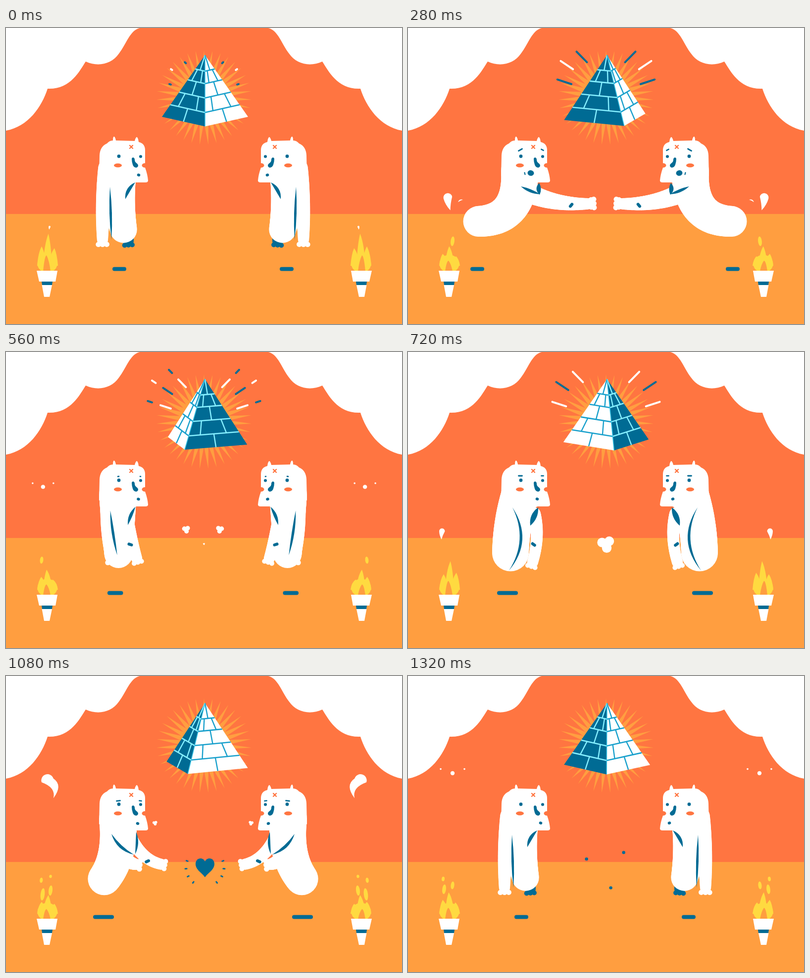
Write an HTML page with a canvas that moves like this. It is 800 px wide and 600 px high and loops after 1.36 s.

```html
<!DOCTYPE html>
<html lang="en">
<head>
<meta charset="utf-8">
<title>Pyramid ritual</title>
<style>
html, body { margin: 0; width: 100%; height: 100%; overflow: hidden; }
canvas { display: block; width: 800px; height: 600px; }
</style>
</head>
<body>
<canvas id="stage" width="800" height="600"></canvas>
<script>
const ctx = document.getElementById('stage').getContext('2d');
const RED = '#ff7541', ORANGE = '#ff9e40', BLUE = '#006b94', YELLOW = '#ffda40', WHITE = '#fff';
const STEP = 40, FRAMES = 34, CYCLE = 17, TAU = Math.PI * 2;

// ---------- helpers ----------
const lerp = (a, b, u) => a + (b - a) * u;
const mix = (a, b, u) => a.map((v, i) => lerp(v, b[i], u));
const clamp = u => Math.min(1, Math.max(0, u));
const smooth = u => u * u * (3 - 2 * u);
const rad = deg => deg * Math.PI / 180;

// Point on a Bezier curve of any degree, given flat x,y pairs.
function bezier(p, u) {
  while (p.length > 2) p = mix(p.slice(0, -2), p.slice(2), u);
  return p;
}

function fillPath(color, build) {
  ctx.fillStyle = color;
  ctx.beginPath();
  build();
  ctx.fill();
}

const ellipse = (color, x, y, rx, ry = rx, turn = 0) =>
  fillPath(color, () => ctx.ellipse(x, y, rx, ry, turn, 0, TAU));

const polygon = (color, ...pts) =>
  fillPath(color, () => { for (let i = 0; i < pts.length; i += 2) ctx.lineTo(pts[i], pts[i + 1]); });

function line(color, width, x1, y1, x2, y2, cap = 'round') {
  ctx.strokeStyle = color;
  ctx.lineWidth = width;
  ctx.lineCap = cap;
  ctx.beginPath();
  ctx.moveTo(x1, y1);
  ctx.lineTo(x2, y2);
  ctx.stroke();
}

// Tapered tube along a curve.
function limb(color, path, r0, r1) {
  for (let u = 0; u <= 1; u += 1 / 48) ellipse(color, ...bezier(path, u), lerp(r0, r1, u));
}

// Two arcs between the same tips, each bowed sideways by its own amount.
function crescent(color, [x1, y1, x2, y2, bowA, bowB]) {
  const len = Math.hypot(x2 - x1, y2 - y1), nx = (y1 - y2) / len, ny = (x2 - x1) / len;
  const control = bow => [(x1 + x2) / 2 + nx * bow * 2, (y1 + y2) / 2 + ny * bow * 2];
  fillPath(color, () => {
    ctx.moveTo(x1, y1);
    ctx.quadraticCurveTo(...control(bowA), x2, y2);
    ctx.quadraticCurveTo(...control(bowB), x1, y1);
  });
}

// Three dots evenly spaced on a ring.
function trio(color, x, y, ring, turn, r) {
  for (let i = 0; i < 3; i++) {
    const a = rad(turn + i * 120);
    ellipse(color, x + ring * Math.cos(a), y + ring * Math.sin(a), r);
  }
}

// Draws once as is and once flipped, with x going to sum - x.
function mirrored(sum, draw) {
  draw();
  ctx.save();
  ctx.translate(sum, 0);
  ctx.scale(-1, 1);
  draw();
  ctx.restore();
}

// ---------- backdrop ----------
const CLOUD = new Path2D('M0 0H270C250 5 243 33 228 52C213 74 185 79 161 68C148 88 130 125 84 123C72 160 45 200 0 208Z');

function backdrop() {
  ctx.fillStyle = RED;
  ctx.fillRect(0, 0, 800, 600);
  ctx.fillStyle = ORANGE;
  ctx.fillRect(0, 377, 800, 223);
  mirrored(800, () => { ctx.fillStyle = WHITE; ctx.fill(CLOUD); });
  fillPath(ORANGE, () => {
    for (let i = 0; i < 70; i++) {
      const r = i % 2 ? 50 : 96, a = i * TAU / 70;
      ctx.lineTo(400 + r * Math.sin(a), 141 - r * Math.cos(a));
    }
  });
}

// ---------- pyramid ----------
const ROWS = [0, .225, .4, .6, .804, 1];
const APEX = [402, 55];

// Corner of the square base, seen in mild perspective.
function corner(deg) {
  const depth = 87 * Math.cos(rad(deg));
  return [402 + 87 * Math.sin(rad(deg)) * 535 / (535 - depth), 180 + .225 * depth];
}

function pyramid(f) {
  const turn = 180 * smooth(f / FRAMES);
  for (let k = -3; k <= 0; k++) {
    const a = corner(turn + k * 90), b = corner(turn + k * 90 + 90);
    const facing = (a[0] - APEX[0]) * (b[1] - APEX[1]) - (a[1] - APEX[1]) * (b[0] - APEX[0]);
    if (facing >= 0) continue;
    const dark = k % 2 !== 0, ink = dark ? '#86efff' : '#18a0cc';
    const at = (h, u) => mix(APEX, mix(a, b, (u + 1) / 2), h);
    polygon(dark ? BLUE : WHITE, ...APEX, ...a, ...b);
    for (let r = 0; r < 5; r++) {
      if (r) line(ink, 2.6, ...at(ROWS[r], -1), ...at(ROWS[r], 1), 'butt');
      for (const u of r % 2 ? [-.54, .5] : [0])
        line(ink, 2.4, ...at(ROWS[r], u), ...at(ROWS[r + 1], u), 'butt');
    }
  }
  for (let k = -3; k <= 0; k++)
    if (Math.cos(rad(turn + k * 90)) > .72) line('#3cc4e6', 1.6, ...APEX, ...corner(turn + k * 90), 'butt');
}

// Each spark: starting point and outward direction.
const SPARKS = [[334, 84, -.83, -.555], [362, 70, -.7, -.72], [331, 114, -.95, -.31]];

function sparks(age, swap) {
  if (age < 0 || age > 14) return;
  const head = 46 * clamp((age - 1.5) / 8.5) + 1, tail = 40 * clamp((age - 6.5) / 7) - 2;
  SPARKS.forEach(([x, y, dx, dy], i) => {
    const color = (i === 0) !== swap ? WHITE : BLUE;
    mirrored(800, () => line(color, 4, x + dx * tail, y + dy * tail, x + dx * head, y + dy * head));
  });
}

// ---------- creatures ----------
// body: bend x,y, rump x,y,radius; arm and far: shoulder, elbow, hand;
// fold and chin: crescents; mouth: x,y,radius; brow: y,tilt,half width; shadow: x,half width.
const POSES = [
  { at: 0, body: [224, 350, 238, 411, 27], arm: [206, 285, 194, 360, 195, 432], far: [240, 330, 244, 380, 247, 434],
    fold: [210, 322, 213, 429, -2.5, 2.5], chin: [261, 313, 241, 347, 0, 7],
    mouth: [268, 298, 3.3], brow: [252, 0, 0], shadow: [229, 10] },
  { at: 1, body: [208, 350, 207, 410, 37], arm: [210, 300, 190, 370, 200, 425], far: [255, 328, 267, 375, 251, 429],
    fold: [211, 315, 204, 443, -23.5, -18], chin: [263, 315, 247, 352, -5, 6],
    mouth: [261, 298, 3.3], brow: [251, 0, 3.5], shadow: [201, 17] },
  { at: 6.5, body: [227, 392, 139, 392, 31], arm: [245, 335, 300, 360, 369, 356], far: [245, 335, 325, 358, 364, 356],
    fold: [228, 321, 267, 337, -2, 4], chin: [265, 314, 266, 338, -3, 6],
    mouth: [248, 294, 6.5], brow: [247, 2, 3.5], shadow: [140, 10] },
  { at: 10.5, body: [232, 368, 197, 413, 33], arm: [225, 330, 232, 378, 264, 382], far: [253, 330, 276, 374, 315, 382],
    fold: [213, 320, 258, 362, 3, 9], chin: [263, 316, 261, 361, -5, 0],
    mouth: [266, 299, 3.3], brow: [253, .3, 3.5], shadow: [197, 17] }
];

// The motion is drawn on twos, apart from the first pose change.
function poseAt(phase) {
  const p = phase < 2 ? phase : 2 * Math.floor(phase / 2) + .5;
  const i = POSES.findLastIndex(pose => pose.at <= p);
  const a = POSES[i], b = POSES[i + 1] || { ...POSES[0], at: 16.5 };
  const u = smooth((p - a.at) / (b.at - a.at));
  const pose = {};
  for (const key in a) if (key !== 'at') pose[key] = mix(a[key], b[key], u);
  return pose;
}

// Three fingertips in line across the end of an arm.
function fingers(color, [, , ex, ey, hx, hy], r) {
  const a = Math.atan2(hy - ey, hx - ex);
  for (const side of [-.7, 0, .7]) {
    const along = .55 * r, across = side * r;
    ellipse(color, hx + along * Math.cos(a) - across * Math.sin(a), hy + along * Math.sin(a) + across * Math.cos(a), r * .45);
  }
}

// Dark mark on the underside of the far wrist.
function cuff(path) {
  const [x, y] = bezier(path, .65), [px, py] = bezier(path, .6);
  const a = Math.atan2(y - py, x - px) + Math.PI / 2;
  line(BLUE, 6, x + 3 * Math.cos(a), y + 3 * Math.sin(a), x + 8 * Math.cos(a + .35), y + 8 * Math.sin(a + .35), 'round');
}

const HEAD = new Path2D('M188 300L189 258Q190 240 204 234Q209 228 216 228Q216 220 218.5 220Q221 222 222 228L260 229Q262 221 264.5 221Q267 223 268 231Q281 234 281 248L281 283Q286 297 287 309Q287 313 282 313L262 313L220 330Z');
const NOSE = new Path2D('M254 265C255 261 260 262 260 267C260 274 267 274 267 279C266 285 258 284 256 277Q254 271 254 265');

function face({ mouth: [mx, my, size], brow: [browY, tilt, half] }) {
  line(RED, 2.4, 250, 238, 256, 244);
  line(RED, 2.4, 256, 238, 250, 244);
  ellipse(RED, 226, 278.5, 8, 4);
  ellipse(RED, 281, 278.5, 6.5, 4.5);
  ellipse(BLUE, 228, 260, 3.4);
  ellipse(BLUE, 272, 260.5, 3);
  ctx.fill(NOSE);
  ellipse(BLUE, mx, my, size, size * .87, .2);
  if (size > 5) line(BLUE, 2, 235.5, 293, 236.5, 297);
  if (half > .8) {
    line(BLUE, 2.8, 227 - half, browY + tilt, 227 + half, browY - tilt);
    line(BLUE, 2.6, 271.5 - half * .6, browY - tilt * .6, 271.5 + half * .6, browY + tilt * .6);
  }
}

function creature(phase) {
  const pose = poseAt(phase), { body, arm, far, shadow } = pose;
  const hanging = far[5] > 430;
  line(BLUE, 8, shadow[0] - shadow[1], 488.5, shadow[0] + shadow[1], 488.5);
  limb(hanging ? BLUE : WHITE, far, 13, 11);
  fingers(hanging ? BLUE : WHITE, far, 11);
  limb(WHITE, [226, 290, ...body.slice(0, 4)], 38, body[4]);
  limb(WHITE, arm, 20, 11);
  fingers(WHITE, arm, 12);
  ctx.fill(HEAD);
  crescent(BLUE, pose.fold);
  crescent(BLUE, pose.chin);
  if (!hanging) cuff(far);
  face(pose);
}

// ---------- torches ----------
const EMBER_BIRTHS = [3, 8, 18, 19.5, 23.5, 25, 27.5, 29];

function flame(f) {
  const p = f % CYCLE, height = 44 + 32 * Math.exp(-p / 4) + 12 * (p / CYCLE) ** 3;
  ellipse(YELLOW, 83.5, 478, 20, 18);
  for (let i = 0; i < 3; i++) {
    const x = 72 + 12 * i, tall = height * (i === 1 ? 1 : .66 + .06 * Math.sin(f + 2 * i));
    const tip = x + 2 * Math.sin(f * .7 + i);
    fillPath(YELLOW, () => {
      ctx.moveTo(x - 9, 482);
      ctx.quadraticCurveTo(x - 7, 488 - tall * .65, tip, 493 - tall);
      ctx.quadraticCurveTo(x + 7, 488 - tall * .65, x + 9, 482);
    });
  }
  fillPath(ORANGE, () => {
    ctx.moveTo(75, 493);
    ctx.quadraticCurveTo(78, 493 - height * .42, 82, 493 - height * .42);
    ctx.quadraticCurveTo(87, 493 - height * .3, 90, 493);
  });
  EMBER_BIRTHS.forEach((birth, i) => {
    const age = f - birth;
    if (age < 1 || age > 9) return;
    const x = i % 2 ? 75 - age * .5 : 90;
    ellipse(YELLOW, x, 453 - 5.2 * age, 4.6 - age * .2, 15 - 1.3 * age, .12);
  });
}

function torch(f) {
  flame(f);
  polygon(WHITE, 62, 492, 104, 492, 100, 514, 67, 514);
  polygon(BLUE, 72, 514, 94, 514, 93, 521, 73, 521);
  polygon(WHITE, 72.5, 521, 93, 521, 88, 545, 77, 545);
}

// ---------- rising wisps ----------
const WISPS = [
  { birth: 0, ease: smooth, path: [88, 403, 98, 350, 50, 310, 78, 268], size: 9, curl: 0 },
  { birth: 17, ease: u => u, path: [73, 375, 45, 320, 105, 135, 90, 197], size: 13, curl: 30 }
];

function wisp({ birth, ease, path, size, curl }, f) {
  const u = (f - birth) / 16;
  if (u < 0 || u > 1.07) return;
  const [x, y] = bezier(path, ease(clamp(u)));
  if (u > .85) {
    const spread = u * 24;
    ellipse(WHITE, x, y, 4.2);
    for (const side of [-1, 1]) ellipse(WHITE, x + side * spread, y - spread * .35, 1.8);
    return;
  }
  const r = Math.max(2, size * Math.sqrt(Math.sin(Math.PI * u)));
  const dx = r * (2 * u - .3), dy = r * 2.9, len = Math.hypot(dx, dy);
  const nx = -dy / len, ny = dx / len, angle = Math.atan2(ny, nx);
  const bend = r * (.3 - curl * Math.max(0, u - .375) ** 2);
  const side = w => [x + dx / 2 + nx * (bend + w * r), y + dy / 2 + ny * (bend + w * r)];
  fillPath(WHITE, () => {
    ctx.arc(x, y, r, angle, angle + Math.PI);
    ctx.quadraticCurveTo(...side(-.6), x + dx, y + dy);
    ctx.quadraticCurveTo(...side(.6), x + nx * r, y + ny * r);
  });
}

function wisps(f) {
  for (const w of WISPS) wisp(w, f);
  const phase = f % CYCLE;
  if (phase >= 5 && phase <= 7) crescent(WHITE, [101, 353, 111, 348, -2.5, -.5]);
}

// ---------- breath and heart ----------
const puff = (x, y, s) => trio(WHITE, x, y, 8.5 * s, 80, 9.7 * s);

function breath(f) {
  const p = f % CYCLE, u = clamp((p - 11) / 4);
  if (p >= 10 && p <= 14) mirrored(796, () => puff(lerp(301, 385, u), lerp(298, 380, u), .28 + .25 * u));
  const size = 1 - Math.abs(f - 18) * .22;
  if (size > 0) puff(400, 389, size);
}

const HEART = new Path2D('M0 20C-5 12 -19 5 -19 -7C-19 -20 -4 -22 0 -12C4 -22 19 -20 19 -7C19 5 5 12 0 20Z');

function heart(f) {
  if (f > 21 && f <= 30) {
    const size = Math.min(1, (f - 21) * .24);
    ctx.save();
    ctx.translate(402, 388);
    ctx.scale(size, size);
    ctx.fillStyle = BLUE;
    ctx.fill(HEART);
    ctx.restore();
  }
  if (f >= 21 && f <= 24) trio(WHITE, 402, 388, 32 * (f - 18) / 5, 30, 1.6);
  if (f >= 25 && f <= 29) mirrored(804, () => {
    for (let i = 0; i < 4; i++) {
      const a = rad(24 * i - 20), r = 37 + (f - 27) * 2;
      line(BLUE, 3, 402 + r * Math.cos(a), 388 + r * Math.sin(a), 402 + (r + 3) * Math.cos(a), 388 + (r + 3) * Math.sin(a));
    }
  });
  if (f >= 31) trio(BLUE, 402, 386, 44 * (f - 28) / 5, 80, 3.2);
}

// ---------- loop ----------
const start = performance.now();

function render() {
  const f = Math.floor((performance.now() - start) / STEP) % FRAMES;
  backdrop();
  sparks(f, false);
  if (f > 9) sparks(f - 9, true);
  pyramid(f);
  mirrored(796, () => creature(f % CYCLE));
  mirrored(801, () => torch(f));
  mirrored(800, () => wisps(f));
  breath(f);
  heart(f);
  requestAnimationFrame(render);
}
render();
</script>
</body>
</html>
```
